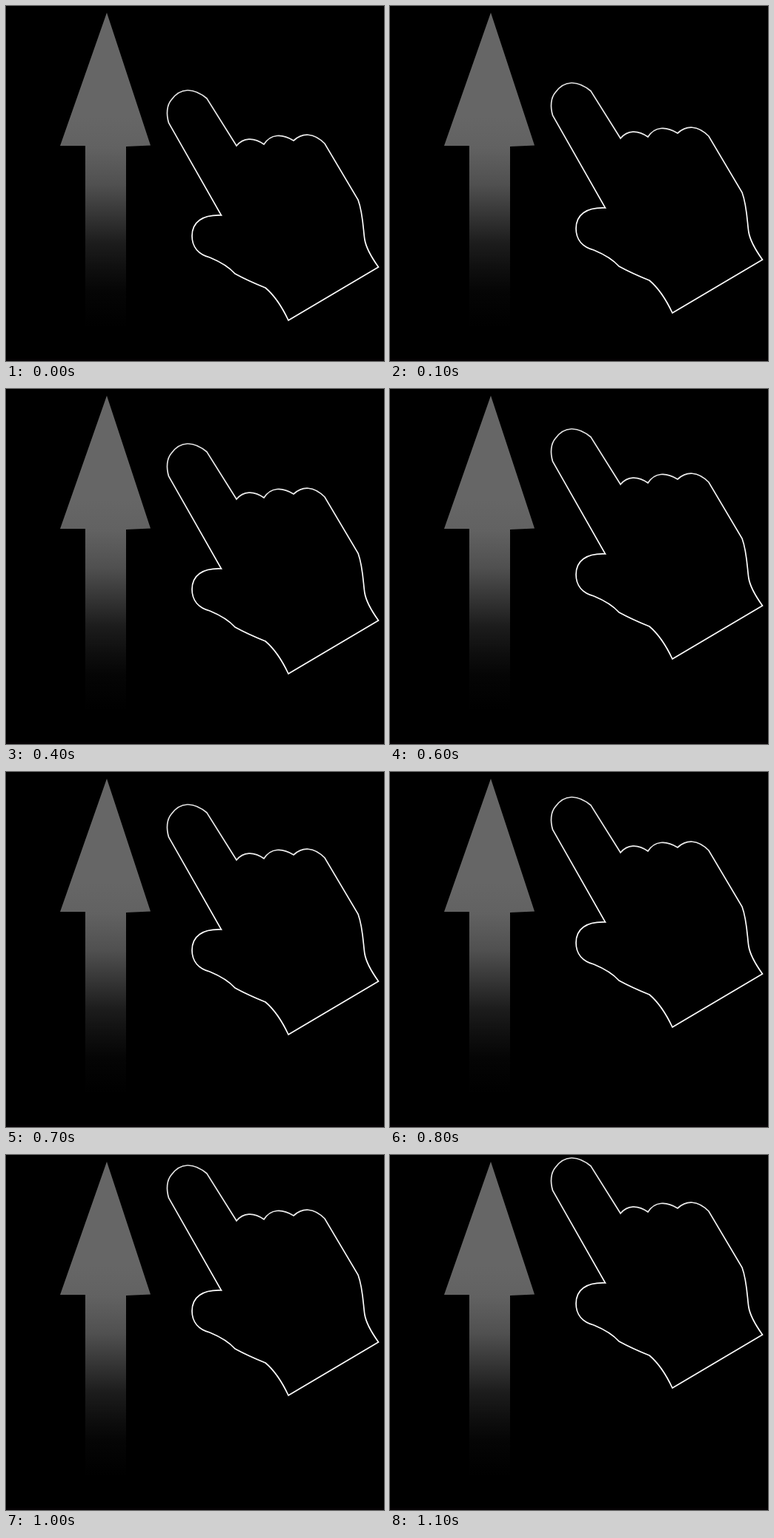
These frames come from a looping animation (510x480 px, 1200 ms). An HTML page:

```html
<!DOCTYPE html>
<html lang="en">
<head>
<meta charset="utf-8">
<title>Swipe up</title>
<style>
  html, body { margin: 0; width: 100%; height: 100%; overflow: hidden; background: #000; }
  svg { display: block; width: 510px; height: 480px; }
  #hand { fill: #000; stroke: url(#line); stroke-width: 1.7; stroke-linejoin: miter; }
</style>
</head>
<body>
<svg viewBox="0 0 510 480">
  <defs>
    <linearGradient id="fade" gradientUnits="userSpaceOnUse" x1="0" y1="150" x2="0" y2="435">
      <stop offset="0" stop-color="#666"/>
      <stop offset=".14" stop-color="#626262"/>
      <stop offset=".32" stop-color="#505050"/>
      <stop offset=".45" stop-color="#383838"/>
      <stop offset=".6" stop-color="#1c1c1c"/>
      <stop offset=".72" stop-color="#0f0f0f"/>
      <stop offset=".83" stop-color="#050505"/>
      <stop offset="1" stop-color="#000"/>
    </linearGradient>
    <linearGradient id="line" x1="0" y1="0" x2="0" y2="1">
      <stop offset="0" stop-color="#e2e2e2"/>
      <stop offset=".6" stop-color="#fff"/>
    </linearGradient>
  </defs>
  <path fill="#050204" d="M0 477H510V480H0Z"/>
  <path fill="url(#fade)" d="M136 9L195 188.5L162 190V435H107V189H73Z"/>
  <path id="hand" d="M219.5 158C216 146 217 134 223 127C235 110 253 110 271 125L311 189
    C320 178 334 177 348 187C357 173 372 172 388 182C400 171 415 171 430 186L475 262
    C482 281 482 305 484 316C486 328 494 341 502.5 353L381 425
    C373 408 363 392 350 381C335 375 320 368 309 362C301 353 287 345 275 340
    C260 336 251 326 251 311C251 292 265 282 290.5 283Z"/>
</svg>
<script>
  // The hand climbs 10px every 100ms, then jumps back down.
  const STEPS = 12, RISE = 10, STEP_MS = 100;
  document.getElementById('hand').animate(
    [{ transform: 'translateY(0px)' }, { transform: `translateY(${-STEPS * RISE}px)` }],
    { duration: STEPS * STEP_MS, easing: `steps(${STEPS}, end)`, iterations: Infinity }
  );
</script>
</body>
</html>
```
